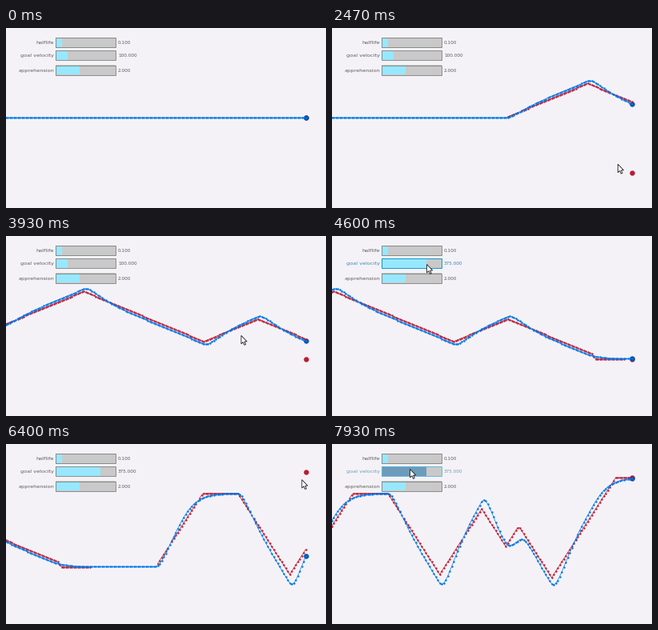
A matplotlib script for the animation above (8 s loop, 400x225 px).

```python
import math
import numpy as np
import matplotlib.pyplot as plt
from matplotlib.animation import FuncAnimation
from matplotlib.patches import Polygon, Rectangle

W, H, DPI = 400, 225, 100
PX = 72 / DPI
LOOP, TICK = 8000, 40
DT, SCALE, DOT = 1 / 60, 0.625, 2.5
STEPS_PER_TICK = 3.844
X_NOW, Y_START, TRAIL = 375, 112.5, 154
MAROON, BLUE, DARKBLUE = "#b81c34", "#0074e6", "#0052ac"
HALFLIFE, APPREHENSION = 0.1, 2.0

# clicks that set a new goal: step -> (pointer x, goal height)
CLICKS = {75: (331, 26), 116: (358, 181), 176: (356, 55), 203: (352, 154),
          294: (377, 62), 335: (368, 205), 361: (370, 35), 382: (374, 148),
          394: (376, 105), 401: (377, 196), 417: (373, 42.5)}
PRESS, RELEASE = 245, 268
# other pointer stops: entering, dragging the slider, lingering, hovering
STOPS = {57: (352, 207), PRESS: (119, 36), RELEASE: (119, 36),
         415: (376, 187), 456: (98, 32)}
PATH = sorted({**CLICKS, **STOPS}.items())
N_STEPS = 460


def goal_at(step):
    past = [k for k in CLICKS if k <= step]
    return CLICKS[past[-1]][1] if past else Y_START


def speed_at(step):
    return 375.0 if step >= PRESS else 100.0


def pointer_at(step):
    """Rest after each stop, then speed up towards the next one."""
    if step < PATH[0][0]:
        return None
    for (s0, a), (s1, b) in zip(PATH, PATH[1:]):
        if step < s1:
            u = ((step - s0) / (s1 - s0)) ** 2.5
            return a[0] + (b[0] - a[0]) * u, a[1] + (b[1] - a[1]) * u
    return PATH[-1][1]


def simulate():
    """Velocity spring: returns the heights of the linear target and the spring."""
    damp = 2 * math.log(2) / HALFLIFE
    decay = math.exp(-damp * DT)
    ahead = APPREHENSION * HALFLIFE
    x = xi = Y_START
    v = 0.0
    mids, xs = [xi] * (TRAIL + 1), [x] * (TRAIL + 1)
    for step in range(N_STEPS):
        goal, speed = goal_at(step), speed_at(step) * SCALE
        gap = goal - xi
        vel = math.copysign(speed, gap)
        future = xi + vel * ahead if abs(gap) > speed * ahead else goal
        j0 = x - future
        j1 = v + j0 * damp
        x = decay * (j0 + j1 * DT) + future
        v = decay * (v - j1 * damp * DT)
        xi = xi + vel * DT if abs(gap) > speed * DT else goal
        mids.append(xi)
        xs.append(x)
    return np.array(mids), np.array(xs)


mids, xs = simulate()

fig = plt.figure(figsize=(W / DPI, H / DPI), dpi=DPI, facecolor="#f4f2f6")
ax = fig.add_axes([0, 0, 1, 1])
ax.set_xlim(0.5, W + 0.5)
ax.set_ylim(H + 0.5, 0.5)
ax.axis("off")


class Slider:
    X, WIDTH, HEIGHT = 62.5, 75, 12.5
    # border, fill, text
    STYLES = {"normal": ("#838383", "#97e8ff", "#5c5c5c"),
              "focused": ("#5bb2d9", "#6c9bbc", "#6c9bbc"),
              "pressed": ("#0492c7", "#97e8ff", "#368baf")}

    def __init__(self, label, y, top):
        self.y, self.top = y, top
        back = Rectangle((self.X, y), self.WIDTH, self.HEIGHT, fc="#c9c9c9", lw=0)
        self.fill = Rectangle((self.X + 0.6, y + 0.6), 0, self.HEIGHT - 1.2, lw=0)
        self.edge = Rectangle((self.X + 0.3, y + 0.3), self.WIDTH - 0.6,
                              self.HEIGHT - 0.6, fill=False, lw=0.9 * PX)
        for patch in (back, self.fill, self.edge):
            ax.add_patch(patch)
        base = y + self.HEIGHT / 2 + 2.2
        self.label = ax.text(60.5, base, label, ha="right", va="baseline",
                             family="DejaVu Sans", size=6.5 * PX)
        self.number = ax.text(140.5, base, "", ha="left", va="baseline",
                              family="DejaVu Sans", size=5.8 * PX)

    def hit(self, tip):
        return (tip is not None and self.X <= tip[0] <= self.X + self.WIDTH
                and self.y <= tip[1] <= self.y + self.HEIGHT)

    def show(self, value, state="normal"):
        border, fill, text = self.STYLES[state]
        self.fill.set_width((self.WIDTH - 1.2) * value / self.top)
        self.fill.set_facecolor(fill)
        self.edge.set_edgecolor(border)
        self.label.set_color(text)
        self.number.set_color(text)
        self.number.set_text(f"{value:.3f}")


def dots(color, size, z, line=0):
    art, = ax.plot([], [], "-o", color=color, lw=line * PX, ms=size * PX, mew=0, zorder=z)
    art.set_snap(False)
    return art


half = Slider("halflife", 12.5, 1)
speed = Slider("goal velocity", 28.1, 500)
appr = Slider("apprehension", 46.9, 5)
goal_dot, spring_dot = dots(MAROON, 6.4, 3), dots(DARKBLUE, 6.4, 3)
mid_trail, spring_trail = dots(MAROON, 2.5, 4, 0.65), dots(BLUE, 2.5, 5, 0.65)

ARROW = np.array([(0, 0), (0, 10.4), (2.4, 8.2), (4, 11.9), (5.7, 11.2),
                  (4.1, 7.6), (7.2, 7.5)])
arrow = Polygon(ARROW, closed=True, fc="white", ec="#111111", lw=0.8 * PX, zorder=9)
ax.add_patch(arrow)

trail_x = X_NOW - DOT * np.arange(TRAIL)[::-1]


def draw(i):
    # the picture advances 15 times a second
    tick = math.floor((i * TICK + 16) * 0.015)
    step = round(tick * STEPS_PER_TICK)
    end = step + TRAIL + 1
    mid, x = mids[end - TRAIL:end], xs[end - TRAIL:end]
    # the lower trail is hidden where both coincide
    mid_trail.set_data(trail_x, np.where(abs(mid - x) < 0.2, np.nan, mid))
    spring_trail.set_data(trail_x, x)
    goal_dot.set_data([X_NOW], [goal_at(step)])
    spring_dot.set_data([X_NOW], [x[-1]])

    tip = pointer_at(step)
    arrow.set_visible(tip is not None)
    if tip is not None:
        arrow.set_xy(ARROW + tip)

    state = "focused" if speed.hit(tip) else "normal"
    if PRESS <= step <= RELEASE:
        state = "pressed"
    half.show(HALFLIFE)
    speed.show(speed_at(step), state)
    appr.show(APPREHENSION)
    return []


anim = FuncAnimation(fig, draw, frames=LOOP // TICK, interval=TICK,
                     repeat=True, repeat_delay=0, blit=False)
plt.show()
```
